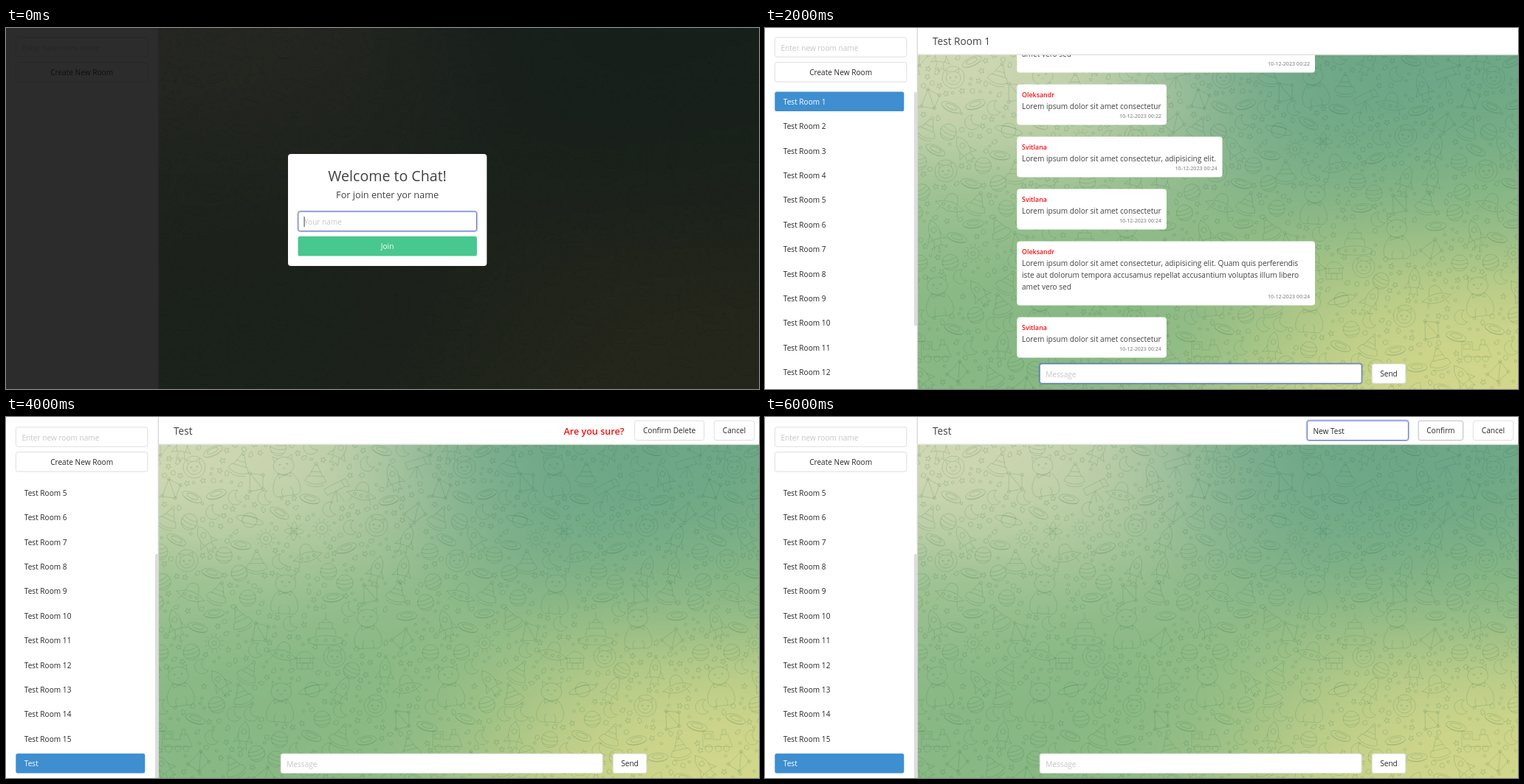
An HTML page with a canvas that plays this animation: 1020x490 px, repeating every 8000 ms.

```html
<!DOCTYPE html>
<html lang="en">
<head>
<meta charset="utf-8">
<title>Chat rooms</title>
<style>
html, body { margin: 0; width: 100%; height: 100%; overflow: hidden; background: #fff; }
canvas, svg { position: absolute; left: 0; top: 0; display: block; }
canvas { left: 207px; }
text { font-family: "Open Sans", "Noto Sans", sans-serif; white-space: pre; }
</style>
</head>
<body>
<canvas id="wall" width="813" height="490"></canvas>
<svg id="stage" width="1020" height="490" viewBox="0 0 1020 490"></svg>
<script>
const SCENE_MS = 2000, TILE = 366;
const stage = document.getElementById('stage');
const wall = document.getElementById('wall');
const ctx = wall.getContext('2d');

// ---------- wallpaper ----------
const cream = [213, 218, 182], teal = [107, 165, 135], yellow = [211, 215, 138], green = [136, 184, 132];
const blobs = [
  { x: .02, y: .08, rgb: cream, weight: 1 },
  { x: .82, y: .03, rgb: teal, weight: 1 },
  { x: .95, y: .95, rgb: yellow, weight: 1 },
  { x: .25, y: .75, rgb: green, weight: 1 },
  { x: 0, y: .42, rgb: green, weight: .4 },
  { x: 1, y: .42, rgb: green, weight: .5 }
];

function makeGradient(w, h) {
  const c = document.createElement('canvas');
  c.width = w; c.height = h;
  const g = c.getContext('2d'), img = g.createImageData(w, h);
  for (let i = 0; i < w * h; i++) {
    const u = (i % w) / (w - 1), v = Math.floor(i / w) / (h - 1);
    const sum = [0, 0, 0];
    let total = 0;
    for (const b of blobs) {
      const k = b.weight * Math.max(0, .9 - Math.hypot(u - b.x, v - b.y)) ** 3;
      total += k;
      b.rgb.forEach((n, j) => sum[j] += n * k);
    }
    sum.forEach((n, j) => img.data[i * 4 + j] = n / total);
    img.data[i * 4 + 3] = 255;
  }
  g.putImageData(img, 0, 0);
  return c;
}

function random(seed) {
  return () => (seed = (seed * 16807) % 2147483647) / 2147483647;
}

const ring = (r, x = 0, y = 0, ry = r) =>
  `M${x - r} ${y}a${r} ${ry} 0 1 0 ${2 * r} 0a${r} ${ry} 0 1 0 ${-2 * r} 0`;

function polar(n, radius) {
  return Array.from({ length: n }, (_, i) => {
    const a = i / n * 2 * Math.PI - Math.PI / 2, r = radius(i);
    return [(r * Math.cos(a)).toFixed(2), (r * Math.sin(a)).toFixed(2)].join(' ');
  });
}

const star = 'M' + polar(10, i => i % 2 ? 1.9 : 4).join('L') + 'z';
const rays = polar(12, () => 10).map((p, i) => 'M' + p + 'L' + polar(12, () => 13)[i]).join('');

// kind: path, clear radius, largest tilt
const kinds = {
  cat: [ring(14, 0, -14, 12) + 'M-12-20l-1-8 7 4M12-20l1-8-7 4M-9-4q-12 14-9 26q3 7 10 5h16q7 2 10-5q3-12-9-26' +
        'M-7 27q-2-9 2-11M7 27q2-9-2-11' + ring(1, -5, -16) + ring(1, 5, -16) + 'M-2-11q2 2 4 0M-8-4l8 4 8-4v6l-8-4-8 4z', 26, .15],
  face: [ring(15) + ring(10, 0, 1, 9) + 'M-8-5l-1-6 6 3M8-5l1-6-6 3' + ring(1, -4, 0) + ring(1, 4, 0) + 'M-3 4q3 3 6 0', 16, .4],
  planet: [ring(11) + 'M-10-5q10 4 20 0M-11 0q11 5 22 0M-9 6q9 4 18 0', 12, .5],
  saturn: [ring(10) + ring(19, 0, 0, 5) + 'M-9-4q9-3 18 0', 16, .5],
  sun: [ring(8) + ring(3) + rays, 14, .3],
  atom: [ring(13, 0, 0, 4) + ring(4, 0, 0, 13) + ring(2) + 'M-10-10l20 20M10-10l-20 20', 14, .6],
  rocket: ['M0-19q11 10 6 27h-12q-5-17 6-27zM-7 0l-6 10 7-2M7 0l6 10-7-2M-4 9l-2 10 4-3 2 6 2-6 4 3-2-10' + ring(3.5, 0, -5), 16, .7],
  ufo: ['M-20 3q20-13 40 0q-20 13-40 0zM-9-3q1-12 9-12t9 12M-12 7l-3 7M12 7l3 7' + ring(2, -9, 3) + ring(2, 0, 4) + ring(2, 9, 3), 17, .4],
  hat: ['M-14 8q14 8 28 0l-3-7h-22zM-9 1l7-15 4 0 7 15M-6-5h12M-11 13q11 5 22 0' + ring(2, 0, -16), 14, .5],
  belt: [ring(14, 0, 0, 6) + ring(8, 0, -1, 3) + 'M-12 3q12 5 24 0', 12, .5],
  tower: ['M-23 14q23-9 46 0v6q-23 5-46 0zM-14 9l2-9h24l2 9M-9 0v-8h18v8M-5-8q5-10 10 0M0-13v-8' +
          ring(2, -12, 16) + ring(2, 0, 16) + ring(2, 12, 16), 22, 0],
  house: ['M-13-3q13-18 26 0zM-11-3v15h22v-15M-4 12v-8h8v8M-11 4h22M-7-3v7M7-3v7', 15, 0],
  train: ['M-20 10v-20h14v11h10v-7h10l6 16zM-17-7h8v7h-8zM6-6v-7h5v7' + ring(5, -12, 13) + ring(4, 1, 13) + ring(4, 12, 13), 20, .1],
  moon: ['M3-10a10 10 0 1 0 7 15a9 9 0 0 1-7-15z', 10, .2],
  links: ['M-13 8L0-13L14-2L4 14zM0-13L4 14' + ring(2, -13, 8) + ring(2, 0, -13) + ring(2, 14, -2) + ring(2, 4, 14), 14, .6],
  scope: ['M-16-2l24-9 4 9-24 9zM-1 3l-8 15M0 3v15M1 3l8 15M8-11l6-2 5 11-7 0', 16, .3],
  star: [star, 4.5, 1],
  dot: [ring(1.8), 3, 0],
  orb: [ring(3.2), 4, 0],
  drop: ['M-3 2q0-5 5-6q2 6-2 7q-3 0-3-1z', 4.5, 1]
};

const places = {
  cat: [171, 43, 171, 203, 283, 250, 28, 328, 165, 350],
  face: [48, 31, 38, 158, 295, 110, 293, 355, 238, 288, 205, 440],
  planet: [1, 146, 109, 175, 255, 425, 252, 188],
  saturn: [123, 103, 208, 333],
  sun: [145, 128, 75, 270, 221, 114],
  atom: [183, 118],
  rocket: [63, 128, 295, 170, 331, 170, 23, 243, 83, 323, 248, 333, 115, 395, 318, 45],
  ufo: [44, 203, 168, 283, 336, 328, 275, 66, 201, 150],
  hat: [111, 238, 113, 341, 80, 203, 110, 28],
  belt: [78, 68, 111, 137, 363, 383, 75, 230, 310, 425],
  tower: [226, 250], house: [198, 293], train: [25, 400], moon: [71, 398],
  links: [330, 263, 328, 373, 16, 60],
  scope: [240, 61, 350, 28]
};

function makeDoodles() {
  const rnd = random(4217), list = [];
  const add = (kind, x, y) => {
    const [d, r, tilt] = kinds[kind];
    list.push({ path: new Path2D(d), x, y, r, a: (rnd() * 2 - 1) * tilt });
  };
  for (const kind in places)
    for (let i = 0; i < places[kind].length; i += 2) add(kind, places[kind][i], places[kind][i + 1]);
  const scatter = (names, tries) => {
    for (let i = 0; i < tries; i++) {
      const x = rnd() * TILE, y = rnd() * 500;
      const kind = names[Math.floor(rnd() * names.length)];
      const free = list.every(o => {
        const dx = Math.abs(o.x - x);
        return Math.hypot(Math.min(dx, TILE - dx), o.y - y) > o.r + kinds[kind][1] + 1;
      });
      if (free) add(kind, x, y);
    }
  };
  scatter(['belt', 'moon', 'planet', 'rocket', 'hat', 'links'], 1500);
  scatter(['star', 'star', 'dot', 'orb', 'drop'], 6000);
  return list;
}

const gradient = makeGradient(136, 76);
const doodles = makeDoodles();

function drawWall(top) {
  ctx.setTransform(1, 0, 0, 1, 0, 0);
  ctx.drawImage(gradient, 0, top, 813, 490 - top);
  ctx.strokeStyle = 'rgba(30,100,60,.18)';
  ctx.lineWidth = .9;
  ctx.lineJoin = ctx.lineCap = 'round';
  for (const o of doodles)
    for (let x = o.x - TILE; x < 850; x += TILE) {
      ctx.setTransform(1, 0, 0, 1, x, o.y + top);
      ctx.rotate(o.a);
      ctx.stroke(o.path);
    }
}

// ---------- interface ----------
const BORDER = '#dbdbdb', FOCUS = '#485fc7', HINT = '#c6c6c6', DARK = '#262626', RED = '#f50f0f';

const rect = (x, y, w, h, fill, r = 0, more = '') =>
  `<rect x="${x}" y="${y}" width="${w}" height="${h}" rx="${r}" fill="${fill}" ${more}/>`;

function text(x, y, s, o = {}) {
  const { size = 10.12, fill = '#414141', anchor = 'start', weight = 400 } = o;
  return `<text x="${x}" y="${y}" text-anchor="${anchor}" style="font-size:${size}px;fill:${fill};font-weight:${weight}">${s}</text>`;
}

const box = (x, y, w, h, stroke = BORDER) =>
  rect(x, y, w, h, '#fff', 2.7, `stroke="${stroke}" stroke-width=".9"`);

const button = (x, y, w, label, stroke) =>
  box(x, y, w, 26.4, stroke) + text(x + w / 2, y + 17.2, label, { anchor: 'middle', fill: DARK });

function field(x, y, w, s, focused, fill = HINT) {
  const glow = focused ? rect(x - 1, y - 1, w + 2, 28.4, 'none', 3.5, `stroke="${FOCUS}" stroke-opacity=".28" stroke-width="1.5"`) : '';
  return glow + box(x, y, w, 26.4, focused ? FOCUS : BORDER) + text(x + 8, y + 17.9, s, { fill });
}

const sidebar = dy =>
  rect(0, 0, 206, 490, '#fff') + rect(205.7, 0, 1.4, 490, '#d6d6d6') +
  field(13.4, 12.8 + dy, 178.4, 'Enter new room name') +
  button(13.4, 46.7 + dy, 178.4, 'Create New Room');

function rooms(names, active, y, barY) {
  const rows = names.map((name, i) => {
    const cy = y + i * 33.4, on = i === active;
    return (on ? rect(13.3, cy - 13.5, 175, 26.6, '#3e8ed0', 2.7) : '') +
      text(24.8, cy + 3.8, name, { fill: on ? '#fff' : DARK });
  });
  return rows.join('') + rect(202, barY, 4, 317, '#dcdcdc', 1);
}

const header = (h, title) =>
  rect(207, 0, 813, h, '#fff') + rect(207, h - 1, 813, 1.3, '#dbdfd8') +
  text(227, h - 13.3, title, { size: 13.65 });

const composer = (y, focused) =>
  field(372.2, y, 436, 'Message', focused) + button(822.2, y, 45.6, 'Send');

function bubble(y, w, name, lines, time) {
  const h = 38.8 + 16 * lines.length;
  return rect(341.3, y, w, h, '#fff', 4) +
    text(348, y + 17.2, name, { size: 8.9, weight: 600, fill: RED }) +
    lines.map((s, i) => text(348, y + 33.3 + 16 * i, s)).join('') +
    text(341.3 + w - 7, y + h - 9.4, time, { size: 7.1, weight: 600, fill: '#949494', anchor: 'end' });
}

const numbered = (from, to) =>
  Array.from({ length: to - from + 1 }, (_, i) => 'Test Room ' + (from + i));

const short = ['Lorem ipsum dolor sit amet consectetur'];
const medium = [short[0] + ', adipisicing elit.'];
const long = [
  medium[0] + ' Quam quis perferendis',
  'iste aut dolorum tempora accusamus repellat accusantium voluptas illum libero',
  'amet vero sed'
];
const day = '10-12-2023 00:';

function welcome() {
  const mid = { anchor: 'middle' };
  return sidebar(0) + rect(0, 0, 1020, 490, 'rgb(10,10,10)', 0, 'fill-opacity=".86"') +
    rect(382, 171, 269.3, 152, '#fff', 4) +
    text(516.6, 208, 'Welcome to Chat!', { ...mid, size: 19.6 }) +
    text(516.6, 231, 'For join enter yor name', { ...mid, size: 12.68 }) +
    field(395.9, 249.2, 241.6, 'Your name', true) +
    rect(403.6, 256, .9, 14, DARK) +
    rect(395.5, 282.8, 242.4, 26.8, '#48c78e', 2.7) +
    text(516.6, 300.2, 'Join', { ...mid, fill: '#fff' });
}

function chat() {
  const [a, b] = ['Oleksandr', 'Svitlana'];
  return sidebar(0) + rooms(numbered(1, 12), 0, 100, 87) +
    bubble(-26.3, 403.7, a, long, day + '22') +
    bubble(76.6, 202.6, a, short, day + '22') +
    bubble(147.6, 278.2, b, medium, day + '24') +
    bubble(218.6, 202.6, b, short, day + '24') +
    bubble(289.6, 403.7, a, long, day + '24') +
    bubble(392.6, 202.6, b, short, day + '24') +
    header(36.5, 'Test Room 1') + composer(455.9, true);
}

const testRoom = actions =>
  sidebar(1) + rooms([...numbered(5, 15), 'Test'], 11, 102.9, 186) +
  header(37.5, 'Test') + actions + button(959.2, 5.1, 54.4, 'Cancel') + composer(457, false);

const remove = () => testRoom(
  text(755.4, 23.6, 'Are you sure?', { size: 12.6, weight: 600, fill: RED }) +
  button(851.6, 5.1, 94, 'Confirm Delete'));

const rename = () => testRoom(
  field(734.4, 5.1, 137, 'New Test', true, DARK) +
  button(885.1, 5.1, 60.5, 'Confirm', '#b5b5b5'));

const scenes = [
  { view: welcome, top: 0 },
  { view: chat, top: 36 },
  { view: remove, top: 37 },
  { view: rename, top: 37 }
];

let shown = -1;
function update(ms) {
  const i = Math.floor(ms / SCENE_MS) % scenes.length;
  if (i === shown) return;
  shown = i;
  drawWall(scenes[i].top);
  stage.innerHTML = scenes[i].view();
}

const start = performance.now();
function tick() {
  update(performance.now() - start);
  requestAnimationFrame(tick);
}
tick();
</script>
</body>
</html>
```
